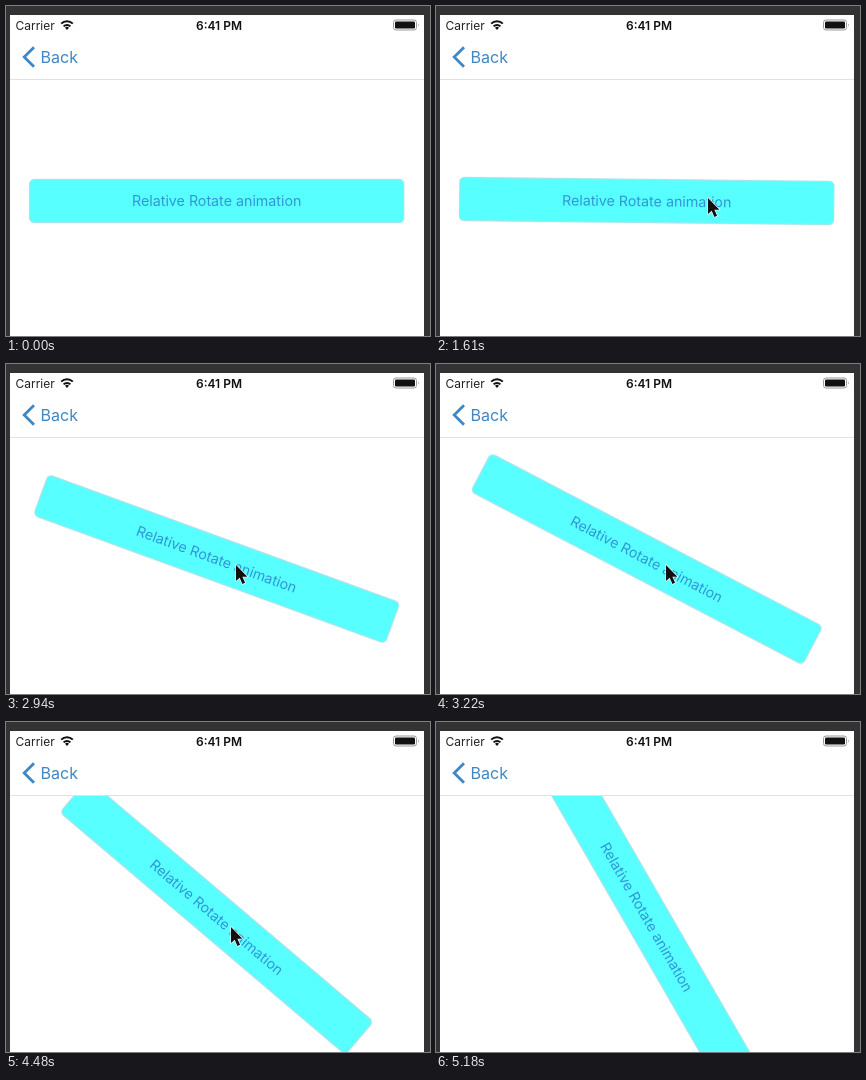
These frames come from a looping animation (424x330 px, 5.74 s). An HTML page:

```html
<!DOCTYPE html>
<html lang="en">
<head>
<meta charset="utf-8">
<title>Relative rotate</title>
<style>
  html, body { margin: 0; width: 100%; height: 100%; overflow: hidden; background: #333; }
  svg { display: block; width: 424px; height: 330px; font-family: Inter, Roboto, sans-serif; }
</style>
</head>
<body>
<svg viewBox="0 0 424 330">
  <defs>
    <clipPath id="page"><rect x="4" y="9" width="414" height="321"/></clipPath>
  </defs>
  <rect width="424" height="330" fill="#333"/>
  <rect x="4" y="9" width="414" height="321" fill="#fff"/>

  <g clip-path="url(#page)">
    <g id="button">
      <rect x="-188" y="-22.5" width="376" height="45" rx="5.5" fill="#dff4f6"/>
      <rect x="-187" y="-21.5" width="374" height="43" rx="4.5" fill="#57ffff" stroke="#a6e3ea"/>
      <text y="5.3" font-size="14.25" text-anchor="middle" fill="#3096d6">Relative Rotate animation</text>
    </g>
  </g>

  <!-- status and navigation bars -->
  <rect x="4" y="9" width="414" height="64" fill="#fff"/>
  <rect x="4" y="73" width="414" height="1" fill="#e2e2e2"/>
  <text x="9.5" y="24" font-size="12" fill="#222">Carrier</text>
  <text x="213" y="24" font-size="12" font-weight="600" text-anchor="middle" fill="#111">6:41 PM</text>
  <g fill="none" stroke="#111" stroke-width="2">
    <path d="M55.2 17.6a8.2 8.2 0 0 1 11.6 0M57.6 20.4a4.8 4.8 0 0 1 6.8 0"/>
    <path d="M61 24l-2-2.2a2.8 2.8 0 0 1 4 0z" fill="#111" stroke="none"/>
  </g>
  <rect x="387.5" y="14" width="23" height="10" rx="2.5" fill="none" stroke="#999"/>
  <rect x="389" y="15.5" width="20" height="7" rx="1.3" fill="#111"/>
  <path d="M412 17.2q1.6 1.8 0 3.6z" fill="#999"/>
  <path d="M28 41.2L18.2 51 28 60.8" fill="none" stroke="#3f88c5" stroke-width="2.8"/>
  <text x="34.5" y="57" font-size="16.1" fill="#3f88c5">Back</text>

  <path id="cursor" d="M0 0v16l3.7-3.3 2.7 6.2 2.7-1.2-2.7-6h5z" fill="#111"
        stroke="#fff" stroke-width="1.2" paint-order="stroke"/>
</svg>
<script>
  const LOOP = 5740, STEP = 70, TURN = 20, DURATION = 700;
  const turnStarts = [1522, 2920, 4415];
  // start, end, destination x and y
  const entry = [386, 332];
  const moves = [
    [210, 770, 260, 184],
    [840, 1120, 272, 192],
    [2240, 2590, 230, 201],
    [4060, 4270, 225, 205],
    [4550, 5140, 216, 331]
  ];
  const button = document.getElementById("button");
  const cursor = document.getElementById("cursor");
  const clamp = v => Math.min(1, Math.max(0, v));
  const smooth = v => v * v * (3 - 2 * v);

  // cubic-bezier(.42, 0, .58, 1)
  function easeInOut(x) {
    let lo = 0, hi = 1;
    for (let i = 0; i < 24; i++) {
      const u = (lo + hi) / 2, w = 1 - u;
      if (1.26 * w * w * u + 1.74 * w * u * u + u ** 3 < x) lo = u;
      else hi = u;
    }
    return smooth(lo);
  }

  function draw(t) {
    const angle = turnStarts.reduce((sum, s) => {
      const p = clamp((t - s) / DURATION);
      return sum + TURN * (p === 1 ? 1 : easeInOut(p));
    }, 0);
    button.setAttribute("transform", `translate(210.7 195) rotate(${angle})`);

    let [x, y] = entry;
    for (const [start, end, toX, toY] of moves) {
      const p = smooth(clamp((t - start) / (end - start)));
      x += (toX - x) * p;
      y += (toY - y) * p;
    }
    cursor.setAttribute("transform", `translate(${x} ${y})`);
    cursor.style.display = t >= 280 && t < 5180 ? "" : "none";
  }

  let origin;
  function tick(now) {
    origin ??= now;
    const t = (now - origin) % LOOP;
    draw(Math.min(5180, Math.floor(t / STEP) * STEP));
    requestAnimationFrame(tick);
  }
  draw(0);
  requestAnimationFrame(tick);
</script>
</body>
</html>
```
